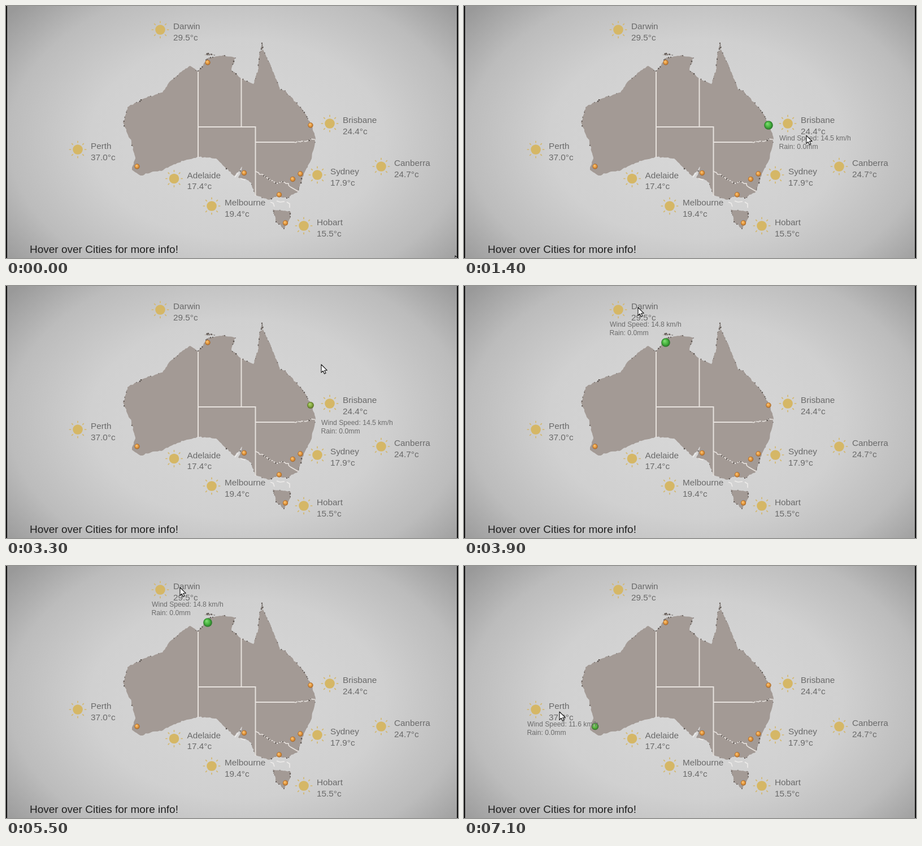
Recreate the animation shown at these times as an HTML page with a canvas. Size 800 by 446 pixels, loop 7200 ms.

```html
<!DOCTYPE html>
<html lang="en">
<head>
<meta charset="utf-8">
<title>City weather map</title>
<style>
html, body { margin: 0; height: 100%; overflow: hidden; background: #111; }
canvas { display: block; width: 100vw; height: 100vh; }
</style>
</head>
<body>
<canvas id="stage" width="800" height="446"></canvas>
<script>
const ctx = document.getElementById('stage').getContext('2d');
const LOOP = 7200, STEP = 100;

const city = (name, temp, sun, marker, wind, enter = Infinity, leave = Infinity) =>
  ({ name, temp, sun, marker, wind, enter, leave });

const cities = [
  city('Darwin', '29.5', [273, 42], [357, 100], '14.8', 3750, 5720),
  city('Brisbane', '24.4', [573, 208], [539, 211], '14.5', 1050, 3210),
  city('Perth', '37.0', [127, 254], [232, 284], '11.6', 7040),
  city('Canberra', '24.7', [664, 284], [507.5, 306.5], '15.3', 650, 830),
  city('Sydney', '17.9', [551, 299], [521, 297], '8.2', 740, 835),
  city('Adelaide', '17.4', [297.5, 305.5], [421.5, 295.5]),
  city('Melbourne', '19.4', [364, 354], [483.5, 334]),
  city('Hobart', '15.5', [527, 389], [494.5, 384])
];

// time, x, y of the pointer tip
const pointerStops = [
  [0, 795, 442], [400, 795, 442], [900, 605, 235], [2300, 608, 215], [3180, 608, 215],
  [3300, 558, 139], [3800, 308, 38], [5650, 308, 38], [6100, 171, 197], [7100, 169, 258], [7200, 169, 258]
];

const mainland = '340,115 326,106 313,114 288,136 277,153 246,163 215,179 207,206 222,241 229,270 223,290 ' +
  '238,300 260,293 275,292 303,278 320,272 341,267 372,270 390,288 404,301 418,284 411,304 424,306 ' +
  '434,313 441,334 466,343 480,336 497,340 517,328 527,297 541,270 548,235 540,210 524,182 494,150 ' +
  '485,148 474,118 462,92 455,77 449,82 447,110 438,138 417,129 399,113 406,92 385,87 359,91 340,115';
const tasmania = '472,360 488,362 504,364 503,376 492,394 478,382 472,360';
const capeIslet = '453,66 455,76 452,76 453,66';
const northIslet = '350,87 358,84 369,87 350,87';
const murray = '441,292 465,306 480,314 490,311 500,314 503,320';
const northRiver = '509,241 523,239 547,236';

let seed = 7;
const random = () => (seed = seed * 16807 % 2147483647) / 2147483647;
const clamp = v => Math.max(0, Math.min(1, v));

// Joins key points with a jittered line and scatters dark specks along it.
const specks = [];
function ragged(source, jitter, speckChance) {
  const path = new Path2D();
  const points = source.split(' ').map(p => p.split(',').map(Number));
  path.moveTo(...points[0]);
  points.slice(1).forEach(([bx, by], i) => {
    const [ax, ay] = points[i];
    const n = Math.ceil(Math.hypot(bx - ax, by - ay) / 3.5);
    for (let k = 1; k <= n; k++) {
      const amp = k < n ? jitter : 0;
      const x = ax + (bx - ax) * k / n + (random() - .5) * amp;
      const y = ay + (by - ay) * k / n + (random() - .5) * amp;
      path.lineTo(x, y);
      if (random() < speckChance(x, y)) specks.push([x, y, 1 + random() * 1.5]);
    }
  });
  return path;
}

const coastSpecks = (x, y) => y < 215 ? .3 : y > 300 ? .15 : .03;
const land = [
  ragged(mainland, 2, coastSpecks), ragged(tasmania, 2, () => .35),
  ragged(capeIslet, 1, () => .5), ragged(northIslet, 1, () => .5)
];
const rivers = [murray, northRiver].map(s => ragged(s, 3, () => .35));
const borders = new Path2D('M340 115V268 M340 214H442 M416.5 128V213 M441.5 213V336 M441 241H510 M503 320L517 328');
const shallows = new Path2D('M468 347l5 2 2 6 M479 345l6 2 8-1 M497 347l5 3 0 7 M405 303l6-8 M415 305l8 3');
const arrow = new Path2D('M0 0V14.2L3.2 11.2 5.6 16.4 8 15.3 5.7 10.2H10.2Z');

function text(str, x, y, size, color) {
  ctx.font = `${size}px "Liberation Sans", Arial, sans-serif`;
  ctx.fillStyle = color;
  ctx.fillText(str, x, y);
}

function disc(x, y, r, fill) {
  ctx.fillStyle = fill;
  ctx.beginPath();
  ctx.arc(x, y, r, 0, 7);
  ctx.fill();
}

function drawBackground() {
  ctx.save();
  ctx.translate(410, 235);
  ctx.scale(1, .68);
  const g = ctx.createRadialGradient(0, 0, 0, 0, 0, 520);
  g.addColorStop(0, '#d8d8d8');
  g.addColorStop(.5, '#d0d0d0');
  g.addColorStop(.78, '#bcbcbc');
  g.addColorStop(1, '#999');
  ctx.fillStyle = g;
  ctx.fillRect(-410, -346, 800, 660);
  ctx.restore();
  ctx.fillStyle = '#111';
  ctx.fillRect(0, 0, 2, 446);
  ctx.fillRect(798, 0, 2, 446);
}

function drawMap() {
  ctx.lineJoin = 'round';
  ctx.fillStyle = '#a39a95';
  land.forEach(p => ctx.fill(p));
  ctx.strokeStyle = '#e6e1dd';
  ctx.lineWidth = 2;
  ctx.stroke(borders);
  ctx.lineWidth = 1.6;
  rivers.forEach(p => ctx.stroke(p));
  ctx.strokeStyle = '#eeecea';
  ctx.stroke(shallows);
  ctx.fillStyle = '#5a534f';
  for (const [x, y, size] of specks) ctx.fillRect(x - size / 2, y - size / 2, size, size);
}

function drawSun(x, y) {
  disc(x, y, 8.8, '#d5b766');
  ctx.strokeStyle = '#d4b86e';
  ctx.lineWidth = 1.7;
  ctx.beginPath();
  for (let a = 0; a < 2 * Math.PI; a += Math.PI / 4) {
    const c = Math.cos(a), s = Math.sin(a);
    ctx.moveTo(x + c * 11.8, y + s * 11.8);
    ctx.lineTo(x + c * 15.3, y + s * 15.3);
  }
  ctx.stroke();
}

function drawMarker(x, y, grow) {
  const r = 4.7 + 3.1 * grow, green = clamp((grow - .2) * 3);
  const mix = (a, b) => `rgb(${a.map((v, i) => Math.round(v + (b[i] - v) * green))})`;
  const g = ctx.createRadialGradient(x - r * .3, y - r * .4, 0, x, y, r);
  g.addColorStop(0, mix([255, 206, 130], [135, 226, 120]));
  g.addColorStop(.6, mix([228, 152, 62], [70, 180, 62]));
  g.addColorStop(1, mix([158, 98, 42], [40, 112, 40]));
  disc(x, y, r, g);
}

// Markers swell on hover; panels dip down and back before they close.
function hoverState(t, { enter, leave }) {
  const age = Math.max(0, t - leave);
  const rise = clamp((Math.min(t, leave) - enter) / 120);
  return {
    grow: clamp(rise - age / 150),
    open: t >= enter && age < 500,
    drop: 8.7 * Math.sin(Math.PI * Math.sqrt(clamp(age / 500)))
  };
}

function drawPointer(t) {
  const next = pointerStops.findIndex(stop => stop[0] > t);
  const [t0, x0, y0] = pointerStops[next - 1], [t1, x1, y1] = pointerStops[next];
  const u = (t - t0) / (t1 - t0), eased = u * u * (3 - 2 * u);
  ctx.save();
  ctx.translate(x0 + (x1 - x0) * eased, y0 + (y1 - y0) * eased);
  ctx.fillStyle = '#fff';
  ctx.strokeStyle = '#111';
  ctx.lineWidth = 1.1;
  ctx.fill(arrow);
  ctx.stroke(arrow);
  ctx.restore();
}

function drawCity({ name, temp, sun: [x, y], marker }, grow) {
  drawMarker(...marker, grow);
  drawSun(x, y);
  text(name, x + 23, y - 1, 15.3, '#6a6a6a');
  text(temp + '°c', x + 23, y + 18.5, 15.3, '#6a6a6a');
}

function drawPanel({ sun: [x, y], wind }, drop) {
  text(`Wind Speed: ${wind} km/h`, x - 15, y + 30 + drop, 12.2, '#6c6c6c');
  text('Rain: 0.0mm', x - 15.5, y + 44.5 + drop, 12.2, '#6c6c6c');
}

function render(t) {
  drawBackground();
  drawMap();
  const states = cities.map(c => hoverState(t, c));
  cities.forEach((c, i) => drawCity(c, states[i].grow));
  cities.forEach((c, i) => states[i].open && drawPanel(c, states[i].drop));
  text('Hover over Cities for more info!', 42, 437, 19, '#202020');
  drawPointer(t);
}

function tick(now) {
  render(Math.floor(now % LOOP / STEP) * STEP);
  requestAnimationFrame(tick);
}
requestAnimationFrame(tick);
</script>
</body>
</html>
```
